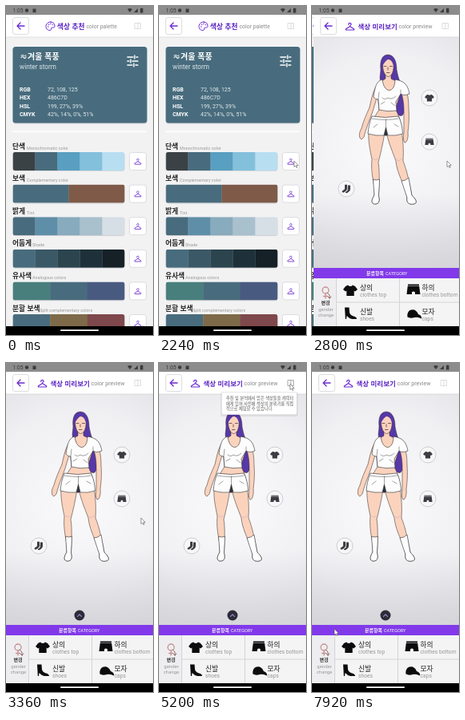
An HTML page that plays this animation: 184x412 px, repeating every 8 s.

```html
<!DOCTYPE html>
<html lang="ko">
<head>
<meta charset="utf-8">
<style>
html, body { margin: 0; width: 100%; height: 100%; overflow: hidden; background: #fff; }
svg { display: block; width: 184px; height: 412px; }
text { font-family: Roboto, "Noto Sans CJK KR", "Noto Sans CJK", sans-serif; white-space: pre; }
.ko { font-family: "Noto Sans CJK KR", "Noto Sans CJK", sans-serif; }
.b { font-weight: 700; }
.line { fill: none; stroke-linecap: round; stroke-linejoin: round; }
</style>
</head>
<body>
<svg viewBox="0 0 184 412">
  <defs>
    <path id="hanger" class="line" d="M-1.8 -2.7C-1.8 -5.6 2 -5 1.5 -2.7Q0 -1.8 0 -.6L5 2.7Q5.6 4 4.5 4H-4.5Q-5.6 4 -5 2.7L0 -.6"/>
    <path id="tee" d="M-3 -6.5Q0 -3.5 3 -6.5L6 -5L9 -1L6 1.5L4.7 .5V7H-4.7V.5L-6 1.5L-9 -1L-6 -5Z"/>
    <path id="shorts" d="M-7 -6.5H7V-4.8H-7ZM-7.2 -4.2H7.2L8.5 6H2V3.5Q0 1.5 -2 3.5V6H-8.5Z"/>
    <path id="boot" d="M-7 -7.5H-1.5L-1 -1Q0 2 4 3.5Q8 4.5 8 7H2Q-2 6 -4.5 3L-5 7H-6.2L-6.5 1Z"/>
    <path id="socks" d="M-3 -8H1.5V0Q1 3 -2 5L-5 7Q-9 7 -8 4L-3 .5ZM3 -7H7.5V1Q7 4 4 6L1 8Q-2 8 -2 6.5L2.5 3Z"/>
    <path id="cap" d="M-8.5 3.5C-10 -7 2 -9 5 0Q10 2 9 5.5Q4 2.5 -2 4.5Q-6 5 -8.5 3.500Z"/>
    <g id="back">
      <rect x="8.5" y="14.5" width="20" height="21" rx="2.5" fill="#fff" stroke="#ddd"/>
      <path class="line" d="M23 25H14M18 21L14 25L18 29" stroke="#6c2bd0" stroke-width="1.3"/>
    </g>
    <path id="guide" class="line" d="M161.5 21.5H168.5V28.5H161.5ZM165 21.5V28.5"/>
    <radialGradient id="studio" gradientUnits="userSpaceOnUse" cx="92" cy="175" r="230">
      <stop offset="0" stop-color="#fafafb"/><stop offset=".5" stop-color="#f0f0f3"/><stop offset="1" stop-color="#d8d8dd"/>
    </radialGradient>
    <linearGradient id="floor" x2="0" y2="1">
      <stop offset="0" stop-color="#cfcfd5" stop-opacity="0"/><stop offset="1" stop-color="#cfcfd5" stop-opacity=".75"/>
    </linearGradient>
  </defs>
  <rect width="184" height="412" fill="#fff"/>

  <g id="palette">
    <rect y="11" width="184" height="390" fill="#f2f2f3"/>
    <rect y="11" width="184" height="28" fill="#fff"/><rect y="38.5" width="184" height="1" fill="#e2e2e4"/>
    <use href="#back"/>
    <path class="line" d="M56 20C48 20 48 31 55.5 30.5C57.5 30 55.5 28 57 27.2C58.5 26.5 61 28 61 25C61 22 59 20 56 20Z" stroke="#6c2bd0"/>
    <path class="line" d="M52.8 26h.1M53.6 23.3h.1M56 22.2h.1M58.4 23.6h.1" stroke="#6c2bd0" stroke-width="1.4"/>
    <text class="ko b" x="64" y="28.8" font-size="8.7" fill="#5b23c4">색상 추천</text>
    <text x="100.5" y="28" font-size="6.9" fill="#888">color palette</text>
    <use href="#guide" stroke="#ddd"/>
    <rect x="8.5" y="51.5" width="168" height="96" rx="3.5" fill="#ccd0d3"/>
    <rect x="8.5" y="51" width="168" height="95.5" rx="3.5" fill="#486c7d"/>
    <g fill="#fff">
      <text class="ko b" x="17" y="67.3" font-size="10">≈겨울 폭풍</text>
      <text x="17" y="78.8" font-size="8.2" fill="#dce5ea">winter storm</text>
    </g>
    <path class="line" d="M152 64H159M163 64H165M161 62V66M152 69H154M158 69H165M156 67V71M152 74H158M162 74H165M160 72V76" stroke="#fff" stroke-width="1.4"/>
    <g id="values" font-size="7" fill="#fff"></g>
    <rect x="8" y="156.5" width="168" height="1.6" fill="#fff"/>
    <g id="rows"></g>
  </g>

  <g id="preview">
    <rect y="11" width="184" height="390" fill="#f4f4f5"/>
    <rect y="39" width="184" height="289" fill="url(#studio)"/>
    <rect y="235" width="184" height="93" fill="url(#floor)"/>
    <rect y="11" width="184" height="28" fill="#fff"/><rect y="38.5" width="184" height="1" fill="#d9d9dc"/>
    <use href="#back"/>
    <use href="#hanger" transform="translate(45.5 26)" stroke="#6c2bd0" stroke-width="1.2"/>
    <text class="ko b" x="55.5" y="28.8" font-size="8.5" fill="#5b23c4">색상 미리보기</text>
    <text x="106.5" y="28" font-size="7.1" fill="#888">color preview</text>
    <use id="help" href="#guide"/>

    <g stroke="#3a2c2c" stroke-width=".55" stroke-linejoin="round" fill="#fbd3bd">
      <path fill="#5638a8" d="M93 61C85 61 83 70 84 79C84 85 82 90 84 94L104 94C105 106 103 114 101 126C102 134 107 139 111 137C115 132 116 122 114 112C111 102 106 92 104 80C104 70 101 61 93 61Z"/>
      <path d="M78 101C74 108 72 118 70 127C66 136 62 145 60 153C56 160 57 166 60 167L63 164C65 155 70 143 74 132C77 122 80 112 82 106Z"/>
      <path d="M113 100C118 108 119 118 119 128C120 140 119 150 118 158C119 166 116 172 114 171C112 168 112 164 113 158C113 148 113 138 113 130C113 120 111 112 109 106Z"/>
      <path d="M69 156C68 170 71 181 73 192C72 202 73 212 76 226L76 237C72 243 72 248 77 248C82 248 83 244 81.500 238C82 224 83 206 81 196C84 184 87 172 89 158Z"/>
      <path d="M91 158C94 172 99 183 103 194C104 206 110 218 115 230L117 240C116 246 119 249 125 248C131 247 128 242 123 237C120 222 117 206 112 194C113 180 112 168 110 156Z"/>
      <path d="M90 84V91C86 94 82 94 80 99C80 112 81 120 82 130C76 139 71 147 70 158L90 162L110 158C110 146 107 138 103 130C104 120 110 110 111 99C109 94 101 94 97 91V84Z"/>
      <path d="M86.500 71C86 82 90 88.500 93.500 88.500C98 88 101 81 100 71C96 65 90 65 86.500 71Z"/>
      <path fill="#5638a8" stroke="none" d="M85.500 77C84.500 66 89 62 93 62C100 62 103 69 101.500 79C100 74 99 69 94 66C91 68 88 71 85.500 77Z"/>
      <path class="line" d="M88 75.500H91M95.500 75.500H98.500M93 77V80M91.500 83.500H95" stroke-width=".7"/>
      <path class="line" d="M75 191Q77.500 195 80 191M104 192Q107 196 110 191" stroke="#c9a3c4"/>
      <path fill="#34323c" d="M82 98L85 106Q90 110 94 107Q101 111 106 106L108 98L108 109Q101 116 94 111Q87 115 82 109Z"/>
      <path fill="#34323c" d="M72 144Q90 152 108 144L109 149Q96 155 92 162H89Q83 153 71 150Z"/>
    </g>
    <g id="clothes">
      <g stroke="#2b2b2e" stroke-width=".6" stroke-linejoin="round" fill="#fdfdfd">
        <path d="M74.500 217Q78 219 82.500 217C82.500 226 81.500 232 81.500 238C83 244 82 248 77 248C72 248 72 243 76 237Z"/>
        <path d="M110 219Q115 219 119 215C121 226 122 232 123 237C128 242 131 247 125 248C119 249 116 246 117 240Z"/>
        <path d="M73 138C70 146 68.500 153 68 160Q78 163 88 162L90.500 152L93 162Q103 163 111.500 160C111 150 109 143 106 138Q90 141 73 138Z"/>
        <path d="M86 92C79 94 77 100 75 114Q77 117 81 117L82 130Q93 133 104 131L103 120L109 110Q113 113 120 110C118 100 115 94 102 92C102 110 88 110 86 92Z"/>
        <path class="line" d="M73 141Q90 144 106 141M90.500 142V152M81 117L82 108M109 110L109 105M84 123L89 120M102 125L97 121M75 152L80 148M106 151L101 148M86 115Q89 118 93 115Q98 118 103 113" stroke-width=".45"/>
      </g>
      <g id="chips" fill="#3c3c42"></g>
    </g>
    <g id="toggle">
      <circle cx="92" cy="316" r="6.5" fill="#2b2c37"/>
      <path class="line" d="M89.500 317.300L92 314.800L94.500 317.300" stroke="#9b8ad8" stroke-width="1.2"/>
    </g>
    <rect y="328" width="184" height="13" fill="#8139ea"/>
    <text class="ko b" x="66" y="336.800" font-size="6" fill="#fff">분류항목</text>
    <text x="90" y="336.500" font-size="5.500" fill="#fff">CATEGORY</text>
    <rect y="341" width="28.500" height="60" fill="#eeeef0"/>
    <path d="M28.500 341V401M107.500 341V401M28.500 371H184" stroke="#d4d4d8" fill="none"/>
    <g class="line" stroke-width="1.300">
      <circle cx="15" cy="356" r="4" stroke="#c98f92"/>
      <path d="M15 360V366M12.500 363.500H17.500" stroke="#c98f92"/>
      <path d="M17 359L20 362V366M20 366L18 364M20 366L22 364" stroke="#8d6465" stroke-width="1"/>
    </g>
    <g text-anchor="middle" font-size="6" fill="#999">
      <text class="ko b" x="15" y="373.500" fill="#333">변경</text>
      <text x="15.500" y="381.500">gender</text><text x="15.500" y="388.500">change</text>
    </g>
    <g id="cells"></g>
    <g id="tip">
      <rect x="77" y="36" width="97" height="31" rx="3" fill="#000" opacity=".08"/>
      <rect x="78.500" y="36.500" width="94" height="28" rx="2" fill="#fff" stroke="#dedee2" stroke-width=".7"/>
      <g font-size="5.240" fill="#555">
        <text class="ko" x="84" y="46">추천 및 분석에서 얻은 색상들을 캐릭터</text>
        <text class="ko" x="84" y="52.700">에게 입혀 사전에 색상의 분위기를 직접</text>
        <text class="ko" x="84" y="59.400">적으로 체험할 수 있습니다.</text>
      </g>
    </g>
  </g>

  <rect width="184" height="11" fill="#8c8c8c"/>
  <g fill="#3c3c3c">
    <text x="8.500" y="8" font-size="6.700">1:05</text>
    <circle cx="26" cy="5.500" r="2.200"/><rect x="33.500" y="3.500" width="4" height="4.500"/>
    <path d="M152 4Q155 2 158 4L155 8ZM160 8L165 3V8ZM168 3H169V2.500H170.500V3H171.500V8.500H168Z"/>
  </g>
  <rect y="401" width="184" height="11" fill="#000"/>
  <rect x="68" y="405.300" width="48" height="1.700" rx=".8" fill="#fff"/>
  <path id="cursor" d="M0 0V7.500L1.700 6L3 8.500L4.200 8L3 5.500H5.300Z" fill="#fff" stroke="#555" stroke-width=".6"/>
</svg>
<script>
const $ = id => document.getElementById(id);
const clamp = v => Math.max(0, Math.min(1, v));
const ease = v => { v = clamp(v); return v * v * (3 - 2 * v); };
const show = (id, alpha) => $(id).setAttribute('opacity', +alpha);
const move = (id, x, y = 0) => $(id).setAttribute('transform', `translate(${x} ${y})`);

$('values').innerHTML = [
  ['RGB', '72, 108, 125'], ['HEX', '486C7D'], ['HSL', '199, 27%, 39%'], ['CMYK', '42%, 14%, 0%, 51%']
].map(([name, value], i) => {
  const y = 107 + i * 10.35;
  return `<text class="b" x="17" y="${y}">${name}</text><text x="52" y="${y}" fill="#e2eaee">${value}</text>`;
}).join('');

// Label, caption, caption x, swatch colours
$('rows').innerHTML = [
  ['단색', 'Monochromatic color', 26, '3b4246 486c7d 599fc1 83c0dc b7def1'],
  ['보색', 'Complementary color', 26, '486c7d 7f5a49'],
  ['밝게', 'Tint', 26, '486c7d 5f8ea8 88abbd a9c0cd d6dfe5'],
  ['어둡게', 'Shade', 33, '486c7d 3b5866 2c444e 1e3039 152127'],
  ['유사색', 'Analogous colors', 33, '487f7c 486c7d 495a80'],
  ['분할 보색', 'Split complementary colors', 42, '486c7d 7e6a49 7e484c']
].map(([label, caption, x, list], i) => {
  const y = 183 + i * 40.6, colors = list.split(' '), w = 140 / colors.length;
  const bars = colors.map((c, k) => `<rect x="${8.5 + k * w}" y="${y}" width="${w + .2}" height="23" fill="#${c}"/>`).join('');
  return `<text class="ko b" x="8" y="${y - 4.5}" font-size="8.7" fill="#222">${label}</text>
    <text x="${x}" y="${y - 3.5}" font-size="5.45" fill="#999">${caption}</text>
    <clipPath id="clip${i}"><rect x="8.5" y="${y}" width="140" height="23" rx="3"/></clipPath>
    <rect x="8.5" y="${y + .8}" width="140" height="23" rx="3" fill="#cfcfd2"/>
    <g clip-path="url(#clip${i})">${bars}</g>
    <rect id="button${i}" x="154.500" y="${y + .5}" width="21" height="22" rx="3" fill="#fff" stroke="#dcdce0"/>
    <use href="#hanger" transform="translate(165 ${y + 12}) scale(.8)" stroke="#7a3fd8" stroke-width="1.2"/>`;
}).join('');

$('chips').innerHTML = [[145, 115, 'tee'], [145, 170, 'shorts'], [41, 229, 'socks']].map(([x, y, icon]) =>
  `<circle cx="${x}" cy="${y}" r="10" fill="#f7f7f8" stroke="#c9c9ce" stroke-width=".9"/>
   <use href="#${icon}" transform="translate(${x} ${y}) scale(.66)"/>`).join('');

$('cells').innerHTML = [
  [46, 356, 'tee', '상의', 'clothes top'], [125, 355, 'shorts', '하의', 'clothes bottom'],
  [46, 385, 'boot', '신발', 'shoes'], [126, 386, 'cap', '모자', 'caps']
].map(([x, y, icon, name, caption], i) => {
  const tx = i % 2 ? 135.5 : 58, ty = i < 2 ? 355.5 : 385.5;
  return `<use href="#${icon}" transform="translate(${x} ${y})" fill="#0c0c0e"/>
    <text class="ko" x="${tx}" y="${ty}" font-size="8.8" fill="#222">${name}</text>
    <text x="${tx}" y="${ty + 8.6}" font-size="6.7" fill="#999">${caption}</text>`;
}).join('');

const bezier = (a, b, c, d, u) => {
  const v = 1 - u;
  return v * v * v * a + 3 * v * v * u * b + 3 * v * u * u * c + u * u * u * d;
};

function cursorAt(t) {
  if (t < 7280) {
    const u = ease((t - 3440) / 560);
    return [bezier(169, 125, 140, 164, u), bezier(194, 130, 5, 26, u)];
  }
  const u = ease((t - 7280) / 640);
  return [164 - 136 * u, 26 + 307 * u];
}

function draw(t) {
  const slide = t - 2720, entering = slide >= 0;
  show('palette', t < 2960);
  move('palette', entering ? -13 + 3 * Math.exp(-slide / 60) : 0);
  $('button0').setAttribute('fill', t >= 2320 && t < 2400 ? '#efeff2' : '#fff');

  show('preview', entering ? clamp(.55 + slide / 160) : 0);
  move('preview', slide < 320 ? 8.5 * Math.exp(-slide / 55) : 0);
  show('clothes', t >= 2800);
  show('toggle', clamp((t - 2880) / 240));
  show('tip', t < 7200 ? clamp((t - 4480) / 160) : 0);
  $('help').setAttribute('stroke', t >= 4400 && t < 7040 ? '#aaa' : '#ddd');

  show('cursor', t >= 2240);
  move('cursor', ...cursorAt(t));
}

const start = performance.now(), step = 80;
function tick() {
  const t = (performance.now() - start) % 8000;
  draw(Math.floor(t / step) * step);
  requestAnimationFrame(tick);
}
tick();
</script>
</body>
</html>
```
